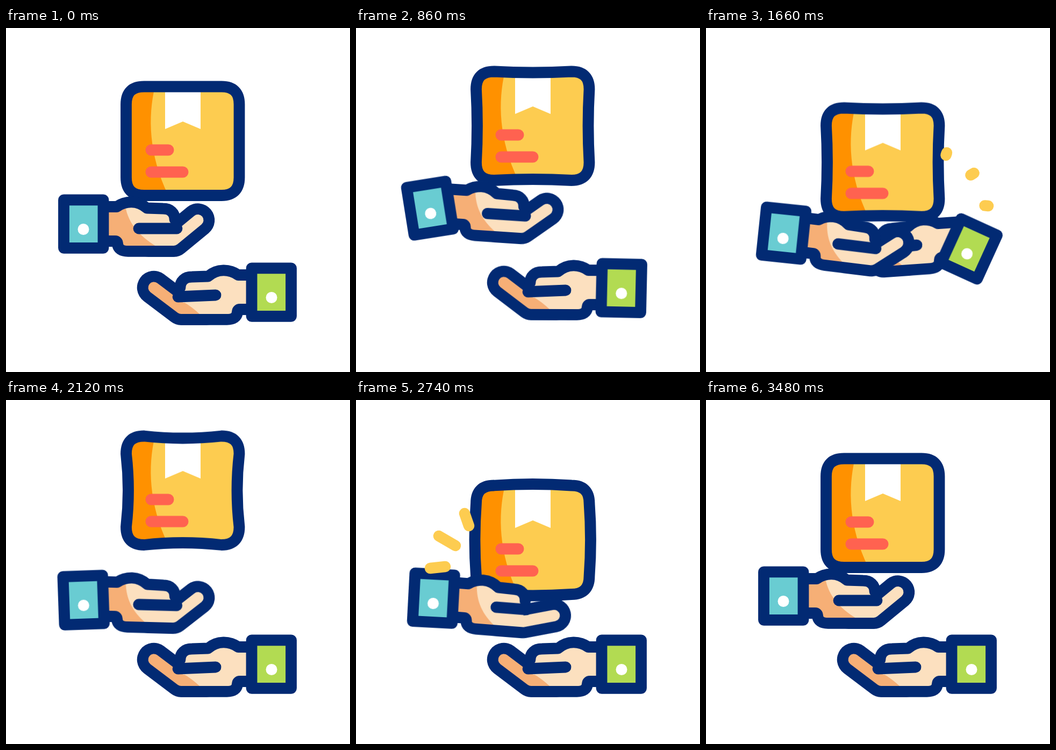
An HTML page for the animation above (3.54 s loop, 640 by 640 pixels).

```html
<!DOCTYPE html>
<html lang="en">
<head>
<meta charset="utf-8">
<title>Parcel toss</title>
<style>
html, body { margin: 0; width: 100%; height: 100%; overflow: hidden; background: #fff; }
svg { display: block; width: 100vw; height: 100vh; }
path { fill: none; }
.ink { stroke: #022a73; stroke-width: 20.8; stroke-linecap: round; stroke-linejoin: round; }
.skin { fill: #fce0bf; }
.shade { fill: #f6af76; }
.finger { stroke-width: 62.5; stroke: #022a73; }
.pad { stroke-width: 21; stroke: #fce0bf; }
.pad.dark { stroke: #f6af76; }
.finger, .pad, .dash { stroke-linecap: round; stroke-linejoin: round; }
.label { stroke: #ff6250; stroke-width: 21; stroke-linecap: round; }
.dash { stroke: #fdcc50; stroke-width: 20.5; stroke-dasharray: 1 3; stroke-dashoffset: 1.05; }

.box, .shell, .palm, .cuff, .bend, .bar, .tone, .dash {
  animation: 3540ms ease-in-out infinite;
}
.palm, .cuff { transform-origin: 191px 364.5px; }
.box { animation-name: box; }
.shell { animation-name: shell; }
.left .palm { animation-name: palm-l; }
.left .cuff { animation-name: cuff-l; }
.right .palm { animation-name: palm-r; }
.right .cuff { animation-name: cuff-r; }
.bend { animation-name: bend; }
.bar { animation-name: bar; }
.tone { animation-name: tone; }
.fall .dash { animation-name: fall; }
.hit-r .dash { animation-name: hit-r; }
.hit-l .dash { animation-name: hit-l; }

@keyframes box {
  0%, 5.65% { transform: translateY(0); animation-timing-function: cubic-bezier(.45,0,.64,1); }
  18.08% { transform: translateY(-53px); animation-timing-function: cubic-bezier(.33,0,.67,.4); }
  32.77% { transform: translateY(70.5px); animation-timing-function: ease-out; }
  34.46% { transform: translateY(73px); animation-timing-function: cubic-bezier(.5,0,.75,.6); }
  46.89% { transform: translateY(40px); animation-timing-function: cubic-bezier(.3,.45,.65,1); }
  57.63% { transform: translateY(-46px); animation-timing-function: ease-in; }
  59.89% { transform: translateY(-42px); animation-timing-function: cubic-bezier(.35,.15,.7,.55); }
  66.38% { transform: translateY(5px); animation-timing-function: linear; }
  70.62% { transform: translateY(40px); animation-timing-function: cubic-bezier(.2,.6,.5,1); }
  77.4% { transform: translateY(50px); }
  87% { transform: translateY(-23px); }
  96.61%, 100% { transform: translateY(0); }
}
@keyframes shell {
  0%, 5.65%, 96.61%, 100% { d: path("M257 109Q328.5 109 401 109C423 109 434 120 434 142Q434 210 434 278C434 300 423 311.5 401 311.5Q328.5 311.5 257 311.5C234 311.5 223.5 300 223.5 278Q223.5 210 223.5 142C223.5 120 234 109 257 109Z"); }
  15.82%, 19%, 59.89% { d: path("M257 109Q328.5 117 401 109C423 109 434 120 434 142Q426 210 434 278C434 300 423 311.5 401 311.5Q328.5 303.5 257 311.5C234 311.5 223.5 300 223.5 278Q231.5 210 223.5 142C223.5 120 234 109 257 109Z"); }
  32.77%, 34.46%, 73.45%, 77.4% { d: path("M257 109Q328.5 104 401 109C423 109 434 120 434 142Q439 210 434 278C434 300 423 311.5 401 311.5Q328.5 316.5 257 311.5C234 311.5 223.5 300 223.5 278Q218.5 210 223.5 142C223.5 120 234 109 257 109Z"); }
  46.89%, 87% { d: path("M257 109Q328.5 113 401 109C423 109 434 120 434 142Q430 210 434 278C434 300 423 311.5 401 311.5Q328.5 307.5 257 311.5C234 311.5 223.5 300 223.5 278Q227.5 210 223.5 142C223.5 120 234 109 257 109Z"); }
}
@keyframes palm-l {
  0%, 5.65% { transform: translate(0, 0) rotate(0deg); }
  15.82%, 17.51% { transform: translate(-2px, -82.5px) rotate(-4deg); }
  32.77% { transform: translate(-2px, 42px) rotate(15deg); }
  34.46% { transform: translate(-2px, 43px) rotate(15.4deg); animation-timing-function: ease-in; }
  46.89% { transform: translate(0, 22px) rotate(7deg); animation-timing-function: ease-out; }
  59.89% { transform: translate(0, 6px) rotate(1.5deg); }
  66.38% { transform: translate(0, 2px) rotate(.5deg); }
  73.45% { transform: translate(0, 10px) rotate(6deg); }
  77.4% { transform: translate(.5px, 8px) rotate(4.5deg); }
  87% { transform: translate(1px, -30px) rotate(-2deg); }
  96.61%, 100% { transform: translate(0, 0) rotate(0deg); }
}
@keyframes cuff-l {
  0%, 5.65% { transform: translate(0, 0) rotate(0deg); }
  15.82%, 17.51% { transform: translate(-11px, -91px) rotate(-27deg); }
  32.77% { transform: translate(-2px, 42px) rotate(17deg); }
  34.46% { transform: translate(-2px, 43px) rotate(17.4deg); animation-timing-function: ease-in; }
  46.89% { transform: translate(0, 22px) rotate(6deg); animation-timing-function: ease-out; }
  59.89% { transform: translate(0, 6px) rotate(-2deg); }
  66.38% { transform: translate(0, 2px) rotate(-1deg); }
  73.45% { transform: translate(0, 8px) rotate(5deg); }
  77.4% { transform: translate(0, 6.5px) rotate(3deg); }
  87% { transform: translate(-3px, -32px) rotate(-13deg); }
  96.61%, 100% { transform: translate(0, 0) rotate(0deg); }
}
@keyframes palm-r {
  0%, 20.34% { transform: translate(0, 0) rotate(0deg); }
  32.77% { transform: translate(0, -41px) rotate(-1deg); }
  34.46% { transform: translate(0, -42px) rotate(-1deg); }
  46.89%, 47.5% { transform: translate(-1.5px, -97px) rotate(4deg); }
  56.5%, 100% { transform: translate(0, 0) rotate(0deg); }
}
@keyframes cuff-r {
  0%, 20.34% { transform: translate(0, 0) rotate(0deg); }
  32.77% { transform: translate(0, -41px) rotate(-6deg); }
  34.46% { transform: translate(0, -42px) rotate(-7deg); }
  46.89%, 47.5% { transform: translate(0, -100px) rotate(-24.5deg); }
  56.5%, 100% { transform: translate(0, 0) rotate(0deg); }
}
@keyframes bend {
  0%, 5.65%, 25.42%, 66.38%, 96.61%, 100% { d: path("M265 394.5L312 394.5L357 357.5"); }
  15.82%, 17.51% { d: path("M265 396L315 396L359 384.5"); }
  73.45%, 77.4% { d: path("M265 394.5L313 394.5L370 379"); }
}
@keyframes bar {
  0%, 5.65%, 25.42%, 66.38%, 96.61%, 100% { d: path("M247 373L318 373"); }
  15.82%, 17.51% { d: path("M251 375L318 375"); }
  73.45%, 77.4% { d: path("M261 372L318 372"); }
}
@keyframes tone {
  0%, 5.65%, 96.61%, 100% { d: path("M165 332L222 332C228 365 250 388 279 406L215 406L200 396L165 396Z"); }
  32.77%, 77.4% { d: path("M165 332L222 332C223 365 238 388 260 406L215 406L200 396L165 396Z"); }
}
@keyframes fall {
  0%, 24.29% { stroke-dashoffset: 1.05; }
  31.64%, 35.88% { stroke-dashoffset: 0; }
  41.81%, 100% { stroke-dashoffset: -1.05; }
}
@keyframes hit-r {
  0%, 38.42% { stroke-dashoffset: 1.05; }
  42.37%, 43.22% { stroke-dashoffset: 0; }
  46.89% { stroke-dashoffset: -.8; }
  47.74%, 100% { stroke-dashoffset: -1.05; }
}
@keyframes hit-l {
  0%, 72.32% { stroke-dashoffset: 1.05; }
  76.84%, 77.68% { stroke-dashoffset: 0; }
  81.92%, 100% { stroke-dashoffset: -1.05; }
}
</style>
</head>
<body>
<svg viewBox="0 0 640 640">
  <defs>
    <path id="flesh" class="skin" d="M165 332.5H206C222 321 245 320 262 335L292 336C306 336 314 344 314 356L312 415.3H227Q209 415 207.5 402Q207.5 396.5 203 396.5H165Z"/>
    <g id="outline" class="ink">
      <path d="M165 332.5H206C222 321 245 320 262 335L292 336C306 336 314 344 314 356"/>
      <path d="M165 396.5H203Q207.5 396.5 207.5 402Q209 415.3 227 415.3H312"/>
    </g>
    <g id="sleeve">
      <rect class="ink" x="107.5" y="319.8" width="73.5" height="89.5"/>
      <circle cx="144" cy="374.5" r="10.5" fill="#fff"/>
    </g>
  </defs>

  <g class="box">
    <rect x="223.5" y="109" width="210.5" height="202.5" rx="33" fill="#fdcc50"/>
    <path d="M277 109C264 165 265 235 302 311.5H257C234 311.5 223.5 300 223.5 278V142C223.5 120 234 109 257 109Z" style="fill:#ff9100"/>
    <path d="M296 109H362V188L329 174L296 188Z" style="fill:#fff"/>
    <path class="label" d="M270 227H302M270 268H329"/>
    <path class="shell ink" d="M257 109Q328.5 109 401 109C423 109 434 120 434 142Q434 210 434 278C434 300 423 311.5 401 311.5Q328.5 311.5 257 311.5C234 311.5 223.5 300 223.5 278Q223.5 210 223.5 142C223.5 120 234 109 257 109Z"/>
  </g>

  <g class="right" transform="translate(638 127) scale(-1 1)">
    <g class="palm">
      <path class="finger" d="M265 394.5H312L363 356"/>
      <use href="#flesh"/>
      <path class="pad dark" d="M265 394.5H312L363 356"/>
      <path class="skin" d="M230 382H309Q293 391 277 406H230Z"/>
      <use href="#outline"/>
      <path class="ink" d="M248 370L318 373"/>
    </g>
    <g class="cuff" fill="#b2db52"><use href="#sleeve"/></g>
  </g>

  <g class="left">
    <g class="palm">
      <path class="finger bend" d="M265 394.5L312 394.5L357 357.5"/>
      <use href="#flesh"/>
      <path class="pad bend" d="M265 394.5L312 394.5L357 357.5"/>
      <path class="shade tone" d="M165 332L222 332C228 365 250 388 279 406L215 406L200 396L165 396Z"/>
      <use href="#outline"/>
      <path class="ink bar" d="M247 373L318 373"/>
    </g>
    <g class="cuff" fill="#69ccd2"><use href="#sleeve"/></g>
  </g>

  <g class="fall">
    <path class="dash" pathLength="1" d="M291.5 55.5V95.5"/>
    <path class="dash" pathLength="1" d="M343.5 91.5V151.5"/>
  </g>
  <g class="hit-r">
    <path class="dash" pathLength="1" d="M440 256L448 232"/>
    <path class="dash" pathLength="1" d="M468 288L498.5 270"/>
    <path class="dash" pathLength="1" d="M493 328L525 331"/>
  </g>
  <g class="hit-l">
    <path class="dash" pathLength="1" d="M210 234L202 211"/>
    <path class="dash" pathLength="1" d="M185 271L154 253"/>
    <path class="dash" pathLength="1" d="M166 310L138 313"/>
  </g>
</svg>
</body>
</html>
```
